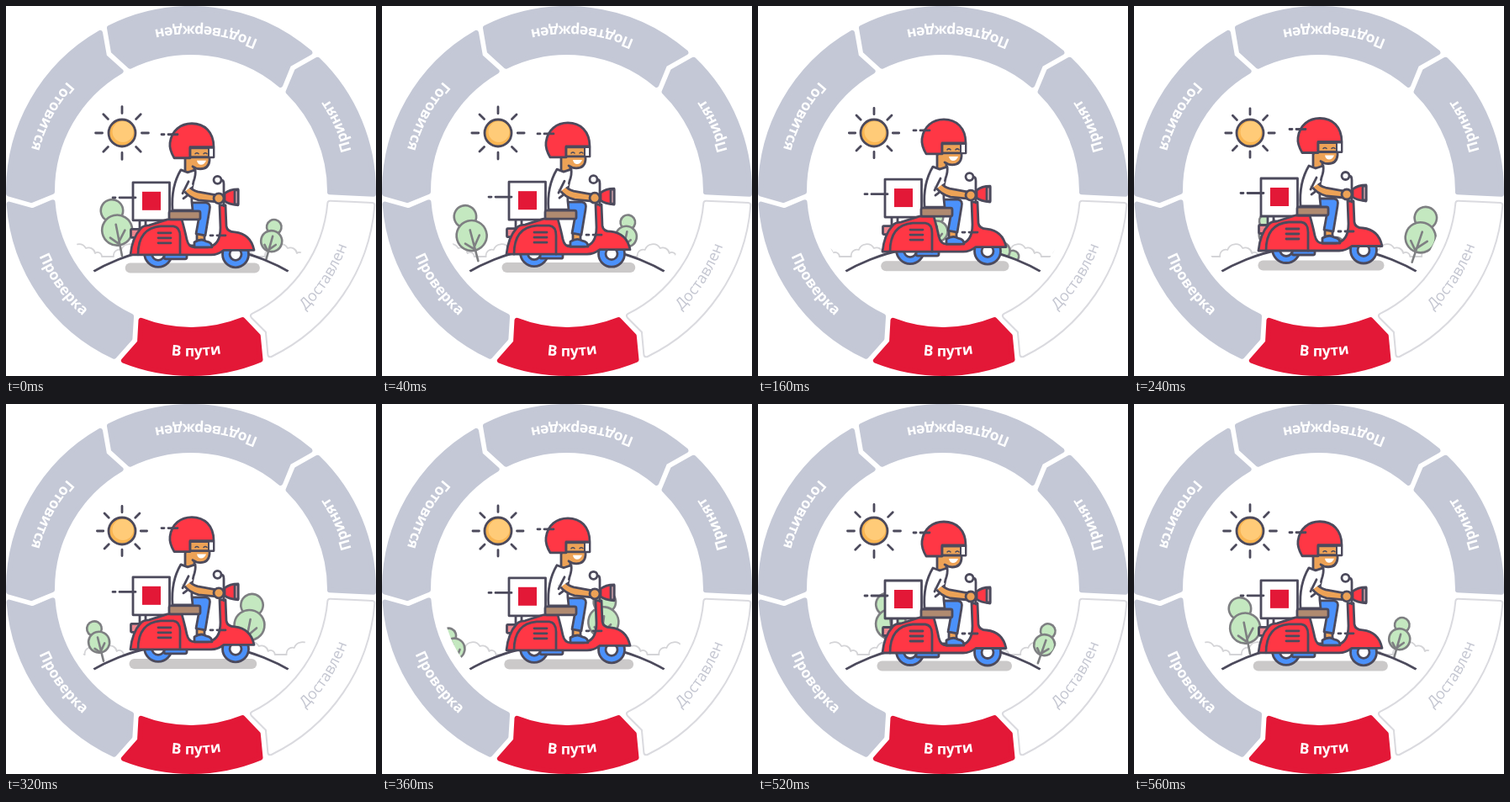
An HTML page that plays this animation: 440 px wide and 440 px high, repeating every 600 ms.

```html
<!DOCTYPE html>
<html lang="ru">
<head>
<meta charset="utf-8">
<style>
  html, body { margin: 0; height: 100%; overflow: hidden; background: #fff; }
  svg { display: block; width: 100vw; height: 100vh; }
  text { font: bold 17.5px "Open Sans", "Noto Sans", sans-serif; text-anchor: middle; fill: #fff; }
  .pending { font-weight: normal; font-size: 18px; fill: #c4c6d1; }
  .ink { stroke: #4c4a5c; stroke-width: 2.8; stroke-linejoin: round; stroke-linecap: round; fill: none; }
  .red { fill: #ff3745; }
  .blue { fill: #4b91fb; }
  .skin { fill: #eda256; }
  .white { fill: #fff; }
  .tree { fill: #c4e8c0; stroke: #7e7f82; stroke-width: 2.6; stroke-linecap: round; }
</style>
</head>
<body>
<svg viewBox="0 0 440 440">
  <defs><clipPath id="view"><circle cx="220" cy="220" r="150"/></clipPath></defs>
  <g id="ring"></g>
  <g clip-path="url(#view)">
    <path id="clouds" fill="#fff" stroke="#d4d4d7" stroke-width="1.8" stroke-linejoin="round"/>
    <g class="tree">
      <g id="big">
        <circle cy="-51" r="13.2"/><circle cx="1" cy="-27" r="18"/>
        <path fill="none" d="M0 4L1-34M0-13L10-25M0-10L-9-20"/>
      </g>
      <g id="small">
        <circle cy="-37" r="8.8"/><circle cx="1" cy="-20" r="12.5"/>
        <path fill="none" d="M0 3L1-26M0-9L7-17M0-7L-6-14"/>
      </g>
      <g id="bush"><circle cx="18" cy="1" r="7"/><circle cx="3" cy="-3" r="10.5"/></g>
    </g>
    <circle class="ink white" cx="220" cy="520" r="235"/>
    <path id="shadow" stroke="#cbc9c9" stroke-width="12" stroke-linecap="round"/>

    <path id="rays" class="ink"/>
    <circle class="ink" cx="138" cy="151" r="16" style="fill:#f9b552"/>
    <circle cx="139" cy="149.500" r="12.500" fill="#ffcb78"/>

    <g id="bike" class="ink">
      <g class="blue">
        <circle cx="181" cy="294" r="16.500"/><circle cx="273" cy="295.500" r="15.500"/>
        <rect x="188" y="293" width="27" height="8" rx="2"/>
      </g>
      <circle class="white" cx="181" cy="295" r="7.500"/>
      <circle class="white" cx="273" cy="295.500" r="7"/>
      <path class="white" d="M159 254V268H166V254"/>
      <rect x="148.500" y="265.500" width="12" height="10" rx="1" fill="#ee858d"/>
      <path class="white" d="M151 210H194.500V255H151Z"/>
      <rect x="162" y="221" width="22" height="22" fill="#e31837" stroke="none"/>
      <path class="red" d="M148 296Q150 276 160 265Q163 261 170 261L192 254H209Q213 268 215 278Q217 287 224 287H240Q255 285 255 264L254 237H261L262 262Q263 269 272 269Q291 271 295 290.500H259Q252 296 244 296Z"/>
      <path d="M157 296Q157 264 184 262H199Q207 263 207 274V296M181 270H196M181 276H196M181 282H196M259 238V212Q259 207 256 207"/>
      <circle class="white" cx="251.500" cy="207" r="4.500"/>
      <path class="red" d="M260 223Q266 218 276 218V237Q265 236 260 232Z"/>
      <path fill="#f0b9bd" d="M272 219H276V236H272Z"/>
    </g>
    <g id="rider" class="ink">
      <path class="skin" d="M227 268H236V281H227Z"/>
      <path class="blue" d="M221 234H238Q244 235 242 243L237 273L226 271L230 249L220 246Z"/>
      <path class="blue" d="M224 287V281Q232 276 238 280Q245 281 245 287Z"/>
      <rect x="194" y="244" width="37" height="10" rx="2" fill="#b08a70"/>
      <path class="skin" d="M213 180H224V198H213Z"/>
      <path class="white" d="M208 195L216 198L225 195Q226 201 223 209Q219 222 222 243H198Q196 215 208 195Z"/>
      <path class="skin" d="M217 214Q221 219 228 221L250 225V233L229 231Q217 228 211 219Z"/>
      <path class="white" d="M216 203L222 214L211 222L207 212" stroke="none"/>
      <path d="M217 209L210 223M211 229L215 226"/>
      <circle class="skin" cx="253" cy="229" r="6"/>
    </g>
    <g id="head" class="ink">
      <path class="skin" d="M215 172H242V185Q241 194 231 194Q224 194 220 190L215 187Z" stroke="none"/>
      <path d="M222 191Q226 194 231 194Q241 194 242 184V178"/>
      <path class="red" d="M200 181Q194 171 195 163C197 148 208 140 221 140C236 140 247 150 247 168H219V181Z"/>
      <path class="skin" d="M219 169H247V180H219Z"/>
      <path class="white" d="M241 169H247V180H241Z" stroke-width="2"/>
      <path d="M225 176q2-2 4 0M235 176q2-2 4 0" stroke-width="1.500"/>
      <path class="white" d="M227 184H238Q236 189 232 189Q228 189 227 184Z" stroke="none"/>
    </g>
    <path id="wind" class="ink"/>
  </g>
</svg>
<script>
const $ = id => document.getElementById(id);
const rad = Math.PI / 180;
const polar = (r, a) => `${(220 + r * Math.cos(a)).toFixed(2)} ${(220 + r * Math.sin(a)).toFixed(2)}`;

// Segment between two edges; `from` is its tail, `to` its arrow head, counterclockwise.
function segment(label, from, to, tail, head, pending) {
  const inset = pending ? 4 : 3, side = 3.2 + inset;
  const inner = 162 + inset, outer = 220 - inset;
  const start = (r, tip = 0) => polar(r, from * rad - (side + tip) / r);
  const end = (r, tip = 0) => polar(r, to * rad + (side - tip) / r);
  const d = `M${start(outer)}A${outer} ${outer} 0 0 0 ${end(outer)}L${end(190, head)}L${end(inner)}` +
    `A${inner} ${inner} 0 0 1 ${start(inner)}L${start(190, tail)}Z`;
  const layer = (color, width) =>
    `<path d="${d}" fill="${color}" stroke="${color}" stroke-width="${width}" stroke-linejoin="round"/>`;
  const body = pending ? layer('#dadadf', 8) + layer('#fff', 4)
    : layer(label === 'В пути' ? '#e31837' : '#c4c8d6', 6);
  const mid = (from + to) / 2 - 1.5, id = 'arc' + Math.round(from);
  return body + `<path id="${id}" fill="none" d="M${polar(196.5, (mid + 40) * rad)}A196.5 196.5 0 0 0 ${polar(196.5, (mid - 40) * rad)}"/>` +
    `<text class="${pending ? 'pending' : ''}"><textPath href="#${id}" startOffset="50%">${label}</textPath></text>`;
}

const labels = ['Принят', 'Подтвержден', 'Готовится', 'Проверка', 'В пути', 'Доставлен'];
const edges = [362.6, 312.3, 241.8, 177.5, 113.3, 66, 2.6];
$('ring').innerHTML = labels.map((label, i) =>
  segment(label, edges[i], edges[i + 1], i ? 9 : 0, i < 5 ? 9 : 0, i === 5)).join('');

$('clouds').setAttribute('d', 'M60 298' +
  'h8a7 7 0 0 1 9-8a10 10 0 0 1 18-2a8 8 0 0 1 11 6a5 5 0 0 1 8 4h6'.repeat(7));

const shift = (id, x, y) => $(id).setAttribute('transform', `translate(${x} ${y})`);

// Plants ride a wide circle around a point far below and come round every 52 degrees.
function plant(id, angle, phase, ground) {
  const a = ((angle - phase * 52 + 26) % 52 + 52) % 52 - 26;
  $(id).setAttribute('transform', `rotate(${a} 220 ${ground + 380}) translate(220 ${ground})`);
}

function draw() {
  const time = Math.floor(performance.now() % 600 / 40) * 40;
  const phase = time % 560 / 560;
  const lift = (1 + Math.cos(2 * Math.PI * (phase - 0.439))) / 2;

  plant('big', -12.6, phase, 284);
  plant('small', 13.7, phase, 288);
  plant('bush', 24.8, phase, 288);
  shift('clouds', -60 * phase, 0);
  shift('bike', 0, -5 * lift);
  shift('rider', 0, -5 * lift);
  shift('head', 0, -6.5 * lift);
  $('shadow').setAttribute('d', `M${147.5 + 6 * lift} ${311.5 - 3 * lift}H${296 - 4.5 * lift}`);
  $('wind').setAttribute('d',
    `M185 ${153 - 6.5 * lift}h3m5 0h11M127 ${228 - 5.5 * lift}h3m5 0h19M243 ${273 - 5 * lift}h3m5 0h10`);

  let rays = '';
  for (let i = 0; i < 8; i++) {
    const c = Math.cos(i * Math.PI / 4), s = Math.sin(i * Math.PI / 4);
    const near = 23.5 - 1.5 * lift, far = 31.5 - 2.3 * lift;
    rays += `M${138 + near * c} ${151 + near * s}L${138 + far * c} ${151 + far * s}`;
  }
  $('rays').setAttribute('d', rays);
  requestAnimationFrame(draw);
}
draw();
</script>
</body>
</html>
```
